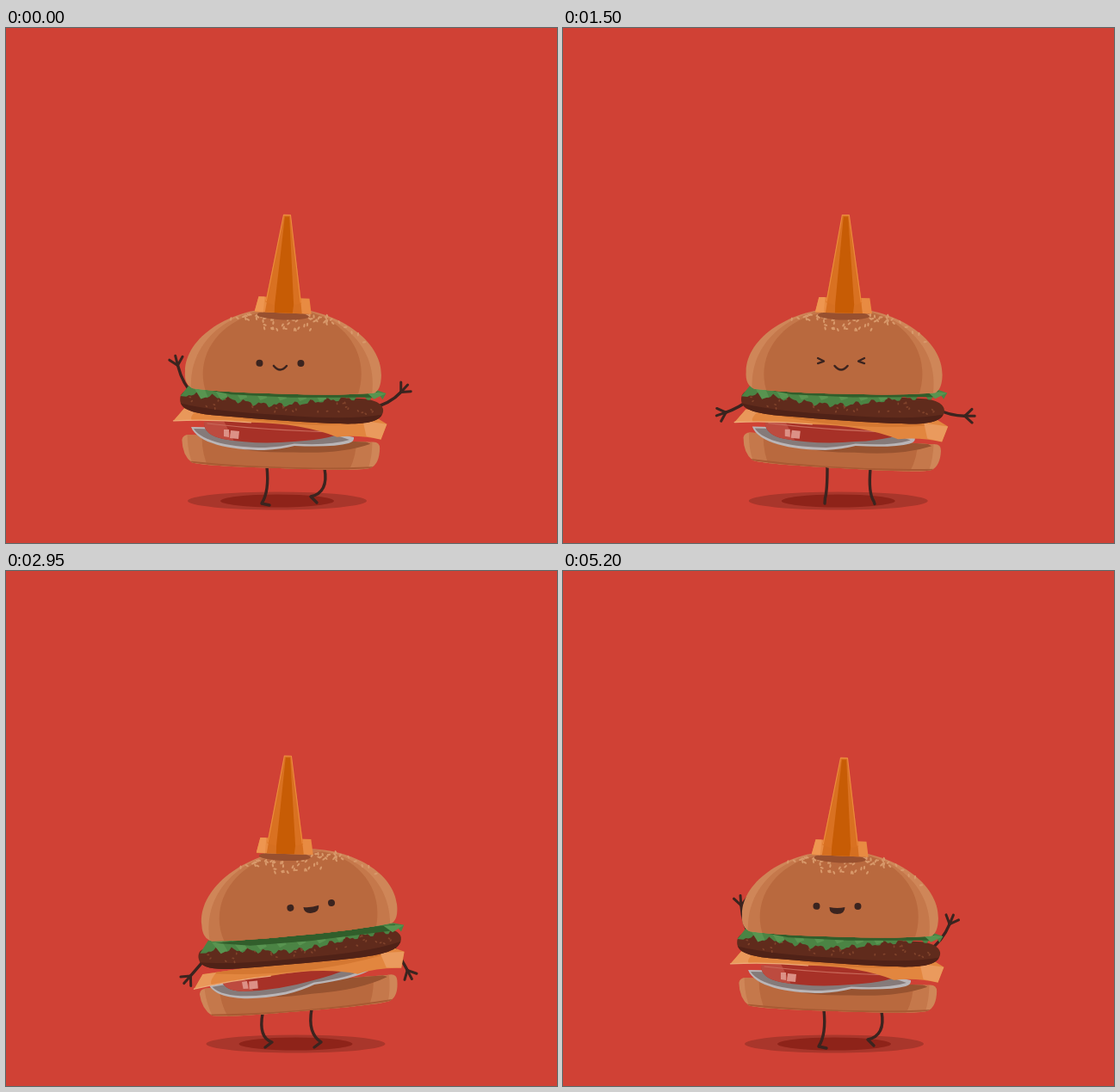
Write an HTML page with a canvas that moves like this. It is 640 by 599 pixels and loops after 5.25 s.

```html
<!DOCTYPE html>
<html lang="en">
<head>
<meta charset="utf-8">
<title>Dancing burger</title>
<style>
html, body { margin: 0; width: 100%; height: 100%; overflow: hidden; background: #d04135; }
canvas { display: block; width: 640px; height: 599px; }
</style>
</head>
<body>
<canvas id="stage" width="640" height="599"></canvas>
<script>
const ctx = document.getElementById('stage').getContext('2d');
const LOOP = 5250, STEP = 50, TAU = Math.PI * 2, DEG = Math.PI / 180;
const INK = '#3b241f';
const BUN = { light: '#cf8658', mid: '#c5784b', main: '#b9693e' };

// Leg: hip x, then knee, ankle and toe offsets with the height of ankle and toe
const stand = x => [x, 3, -6, 553, 3, 555];
const raised = x => [x, 5, -16, 545, -9, 552];
const bent = x => [x, -5, 11, 548, 3, 554];
const STANCE = {
  left: { legL: stand(303), legR: raised(370) },
  both: { legL: bent(298), legR: bent(355) },
  right: { legL: raised(316), legR: [359, 0, -3, 553, 7, 553] }
};

// x of the body, tilts of head, base and fillings, turn of the face, arm angles
const first = { at: 0, x: 319, head: 1.2, base: 1.5, fill: 0, turn: 0, armL: -60, armR: -27, mood: 'smile', ...STANCE.left };
const poses = [
  first,
  { at: 1100, x: 329.5, head: 0.8, base: 0.8, fill: 0, turn: 0, armL: 55, armR: 30, mood: 'open', ...STANCE.both },
  { at: 1900, x: 318, head: 1.2, base: 5, fill: 0.5, turn: 0, armL: 0, armR: -3, mood: 'squint', ...STANCE.right },
  { at: 2950, x: 340.5, head: -6, base: -5, fill: -11, turn: 1, armL: 48, armR: 58, mood: 'open', ...STANCE.both },
  { at: 3700, x: 328, head: 3.2, base: 1.5, fill: 1.5, turn: 1, armL: 65, armR: 50, mood: 'squint', ...STANCE.left },
  { at: 4450, x: 319, head: 6, base: 3, fill: 0, turn: 1, armL: -34, armR: -48, mood: 'smile', ...STANCE.both },
  { ...first, at: 5200, armL: -72, armR: -50, mood: 'open' },
  { ...first, at: LOOP }
];

let seed = 11;
function rnd() {
  seed = (seed * 16807) % 2147483647;
  return seed / 2147483647;
}

const sesame = [];
for (let i = 0; i < 50; i++) {
  const a = rnd() * TAU, r = Math.sqrt(rnd());
  sesame.push([3 + 52 * r * Math.cos(a), -84 + 13 * r * Math.sin(a), rnd() * 3]);
}
for (let i = 0; i < 22; i++) {
  const x = -62 + i * 7.4, rim = -20 - 78 * Math.sqrt(1 - (x / 114) ** 2);
  sesame.push([x, rim + 1 + rnd() * 6, rnd() * 3]);
}
const crumbs = Array.from({ length: 34 }, () => [-108 + rnd() * 216, -8 + rnd() * 14]);

function mix(a, b, k) {
  if (Array.isArray(a)) return a.map((v, i) => mix(v, b[i], k));
  return typeof a === 'number' ? a + (b - a) * k : a;
}

function poly(points, color) {
  ctx.beginPath();
  points.forEach(([x, y]) => ctx.lineTo(x, y));
  ctx.closePath();
  ctx.fillStyle = color;
  ctx.fill();
}

function oval(x, y, rx, ry, color, turn = 0) {
  ctx.beginPath();
  ctx.ellipse(x, y, rx, ry, turn, 0, TAU);
  ctx.fillStyle = color;
  ctx.fill();
}

function shape(d, color) {
  const p = new Path2D(d);
  ctx.fillStyle = color;
  ctx.fill(p);
  return p;
}

function line(d, color, width) {
  ctx.strokeStyle = color;
  ctx.lineWidth = width;
  ctx.stroke(new Path2D(d));
}

// Fills a shape and keeps what draw() adds inside it.
function inside(d, color, draw) {
  ctx.save();
  ctx.clip(shape(d, color));
  draw();
  ctx.restore();
}

function part(x, y, tilt, draw) {
  ctx.save();
  ctx.translate(x, y);
  ctx.rotate(tilt * DEG);
  draw();
  ctx.restore();
}

function drawShadow(x) {
  oval(x, 550, 104, 10.5, '#a9362b');
  oval(x, 550, 66, 7.5, '#8e2319');
}

function drawLeg([x, knee, ankle, ay, toe, ty], pose, lift) {
  const hip = 511 + Math.tan(pose.base * DEG) * (x - pose.x);
  line(`M${x} ${hip - 6}V${hip}Q${x + knee} ${hip + 28} ${x + ankle} ${ay - lift}L${x + toe} ${ty - lift}`, INK, 3.4);
}

function drawArm(side, sx, sy, angle) {
  const a = angle * DEG;
  const wx = sx + side * 39 * Math.cos(a), wy = sy + 41 * Math.sin(a);
  const ex = (sx + wx) / 2 + side * 4, ey = (sy + wy) / 2 + 5;
  line(`M${sx} ${sy}Q${ex} ${ey} ${wx} ${wy}`, INK, 3.4);
  const dir = Math.atan2(wy - ey, wx - ex);
  for (const k of [-0.75, 0, 0.75]) {
    line(`M${wx} ${wy}l${11.5 * Math.cos(dir + k)} ${11.5 * Math.sin(dir + k)}`, INK, 3);
  }
}

function drawBase() {
  inside('M-115 -12Q-114 -19 -104 -18L104 -15Q115 -17 115 -8Q115 10 105 15Q92 19 0 18Q-90 18 -103 14Q-114 6 -115 -12Z', BUN.light, () => {
    shape('M-109 -20Q-108 8 -98 22L100 22Q107 5 106 -20Z', BUN.mid);
    shape('M-92 -20Q-92 5 -82 22L78 22Q88 5 88 -20Z', BUN.main);
    shape('M-100 -19Q-55 3 15 -1Q70 0 104 -13L80 -24Z', '#985330');
    line('M-112 13Q0 22 112 14', '#a85a33', 2);
  });
}

function drawSlices() {
  shape('M-95 -11C-88 8 -50 16 -10 16Q10 15 25 11Q70 13 88 8Q95 6 94 1L50 -8Z', '#b9b5b7');
  shape('M-92 -9C-83 6 -47 13 -9 13Q10 12 25 8.5Q66 11 89 4L60 -6Z', '#857a79');
  inside('M-80 -17Q-81 -2 -58 3Q-20 10 25 6Q75 3 88 -9L70 -20Z', '#a73127', () => {
    shape('M-82 -20Q-80 4 -44 8L-58 -20Z', '#bd4b3f');
    line('M-76 -15Q0 -6 84 -5', '#c9695a', 1.2);
  });
  poly([[-57, -8], [-51, -8], [-51, 1], [-57, 0]], '#dc9186');
  poly([[-49, -7], [-39, -6], [-40, 3], [-50, 2]], '#dc9186');
}

function drawCheese() {
  inside('M-125 1L-112 -14L110 -3L123 5L116 23Q90 17 65 20Q25 4 -35 3Q-80 -1 -125 1Z', '#e2863f', () => {
    shape('M-103 -13Q0 12 98 4L90 -5L-90 -14Z', '#d57832');
    shape('M-125 1L-112 -14L-96 -13Q-108 -3 -103 1Z', '#e9985a');
    shape('M95 1L123 5L116 23L99 19Z', '#ea9a5d');
  });
  line('M-125 1Q-80 -1 -35 3', '#edaa77', 1.3);
}

function drawPatty() {
  inside('M-118 -4C-119 -18 -105 -17 -90 -16L95 -13C112 -12 120 -5 118 2C115 15 95 17 60 17C10 16 -40 14 -80 12C-105 10 -117 6 -118 -4Z', '#602b1c', () => {
    shape('M-120 -1Q-80 8 0 9Q80 13 120 4V22H-120Z', '#502217');
    for (const [x, y] of crumbs) oval(x, y, 1.5, 0.9, '#80432b', x);
  });
}

function drawLeaf() {
  const edge = [];
  for (let x = 116; x >= -112; x -= 3) {
    const depth = 4 + 11 * Math.exp(-(((x + 10) / 64) ** 2));
    edge.push([x, depth + 2.2 * Math.sin(x * 0.33) + 1.4 * Math.sin(x * 0.71)]);
  }
  poly([[-119, 7], [-108, -7], [108, -5], [120, -1], ...edge], '#4b8444');
  for (let x = -104; x < 50; x += 23) {
    poly([[x, -4], [x + 12, -4], [x + 17, 7], [x + 9, 10]], '#589450');
  }
  poly([[-100, -3], [-60, 4], [10, 6], [104, 4], [110, -3]], '#315e2b');
  poly([[96, -3], [120, -1], [106, 6]], '#589450');
}

function drawHead() {
  inside('M-114 -22C-114 -62 -62 -98 0 -98C62 -98 114 -62 114 -22Q114 -5 106 -1Q60 3 0 2Q-65 2 -104 -2Q-115 -6 -114 -22Z', BUN.light, () => {
    shape('M-106 5C-114 -55 -66 -95 -5 -98H10C66 -92 112 -55 103 5Z', BUN.mid);
    shape('M-88 5C-106 -38 -76 -82 -28 -92H34C76 -80 102 -40 86 5Z', BUN.main);
    line('M-106 0Q0 5 107 1', '#a95d35', 1.8);
  });
  for (const [x, y, a] of sesame) oval(x, y, 2.2, 1.1, '#d8996b', a);
}

function drawCone() {
  oval(0, 3, 30, 5, '#98502f');
  poly([[-29, -18], [30, -18], [33, 0], [-33, 0]], '#e88b42');
  poly([[-33, -1], [-29, -18], [-22, -18], [-23, 0]], '#ee9650');
  poly([[-19, -14], [20, -14], [22, 0], [-21, 0]], '#d66f20');
  poly([[-4, -114], [4, -114], [21, -12], [11, -9], [-11, -9], [-21, -12]], '#d97121');
  poly([[-2.5, -112], [2.8, -112], [12, -10], [11, 0], [-10, 0], [-10, -10]], '#c75c05');
  line('M-20 -13L-4 -114H4L20 -13', '#ec8b3e', 1.1);
}

function drawFace(mood) {
  if (mood === 'squint') {
    line('M-27 -6L-20 -2.5L-27 0M27 -6L20 -2.5L27 0', INK, 2.3);
  } else {
    oval(-24, 0, 4, 4, INK);
    oval(24, 0, 4, 4, INK);
  }
  if (mood === 'open') shape('M-9 1Q0 3 9 1Q9 9 0 9Q-9 9 -9 1Z', INK);
  else line('M-7.5 3Q0 12 7.5 3', INK, 2.5);
}

function render(ms) {
  let i = 0;
  while (poses[i + 1].at <= ms) i++;
  const from = poses[i], to = poses[i + 1];
  const u = (ms - from.at) / (to.at - from.at);
  const ease = u * u * (3 - 2 * u);
  const p = {};
  for (const key in from) p[key] = mix(from[key], to[key], ease);
  const mood = u < 0.5 ? from.mood : to.mood;

  // Beat between two poses: bounce, waving arms, lifted feet.
  const wave = Math.sin(u * TAU);
  const hop = 2.5 * wave * wave;

  // The upper layers follow the base; a tilted stack leans and sags.
  const bend = Math.abs(p.head);
  const hx = p.x + 2.5 + 1.6 * Math.max(0, p.head - p.base);
  const hy = 424 - 0.4 * bend - hop;
  const cx = hx + 2.7 * p.head - 3;
  const faceX = 20 * p.turn + 0.8 * p.head - 4;
  const sag = 1.6 * Math.max(0, Math.abs(p.base) - 1);
  const drop = 100 * Math.sin(p.head * DEG);

  ctx.fillStyle = '#d04135';
  ctx.fillRect(0, 0, 640, 599);
  ctx.lineCap = ctx.lineJoin = 'round';
  drawShadow(p.x - 4);
  drawLeg(p.legL, p, Math.max(0, wave) * 5);
  drawLeg(p.legR, p, Math.max(0, -wave) * 5);
  drawArm(-1, p.x - 100, 430 - drop, p.armL + 15 * wave);
  drawArm(1, p.x + 105, 440 + drop, p.armR - 15 * wave);
  part(p.x, 494, p.base, drawBase);
  part(p.x - 9, 475, p.fill, drawSlices);
  part(p.x + 0.5, 455 + sag, p.fill, drawCheese);
  part(hx - 1.5, 441, 1.4 + (p.head + p.fill) / 2, drawPatty);
  part(hx, 423 + 0.4 * bend, p.head, drawLeaf);
  part(hx, hy, p.head, drawHead);
  part(cx, 332 - 0.5 * bend - hop, 1.75 - 0.28 * (cx - 324), drawCone);
  part(hx + faceX, hy - 33.5 + 2 * p.turn + faceX * p.head * DEG, p.head - 1, () => drawFace(mood));
}

const start = performance.now();
function tick() {
  const t = Math.max(0, performance.now() - start) % LOOP;
  render(Math.floor(t / STEP) * STEP);
  requestAnimationFrame(tick);
}
tick();
</script>
</body>
</html>
```
